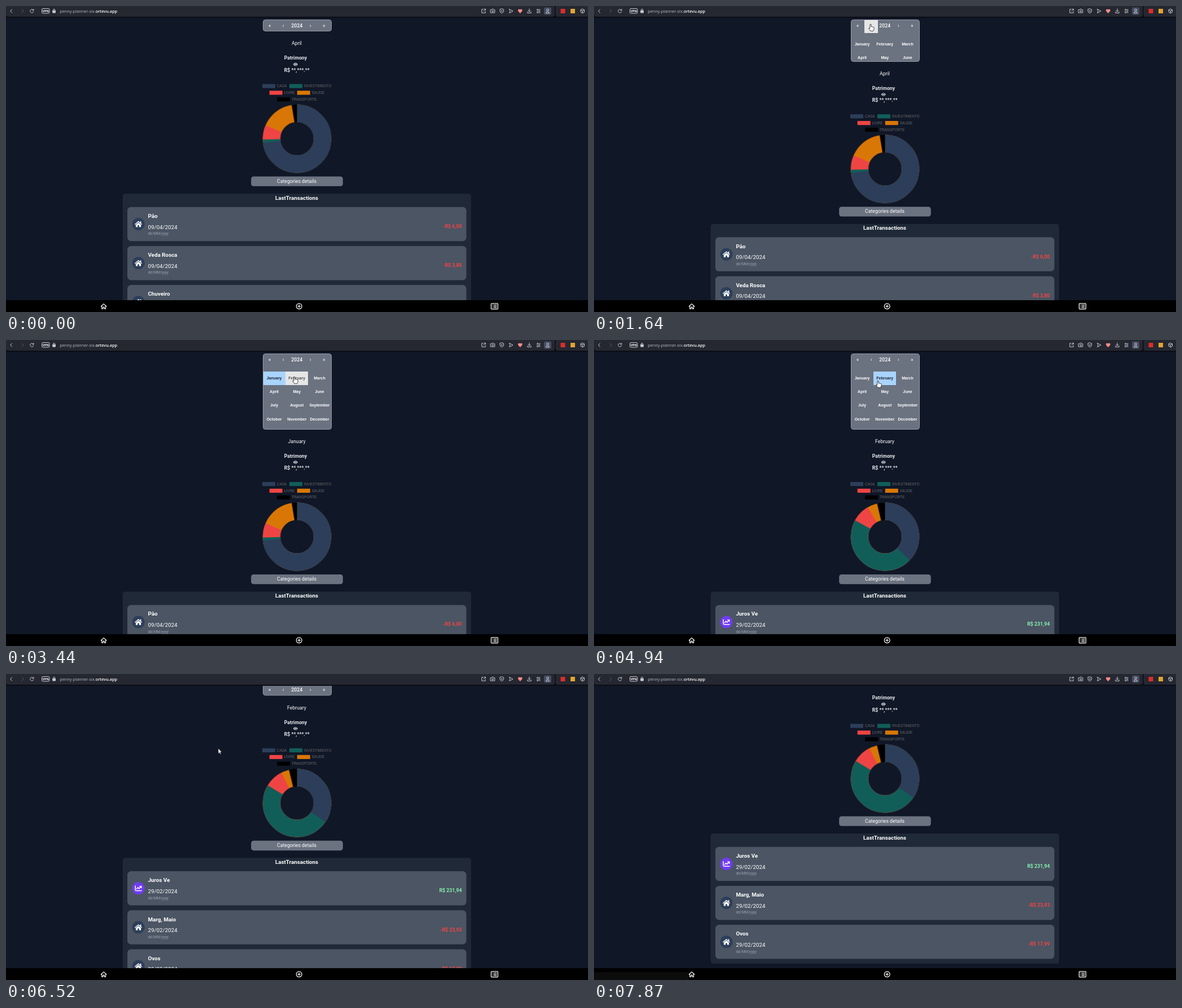
Write an HTML page that moves like this. It is 1031 px wide and 543 px high and loops after 8 s.

```html
<!DOCTYPE html>
<html lang="en">
<head>
<meta charset="utf-8">
<title>Money overview</title>
<style>
html,body{margin:0;width:100%;height:100%;overflow:hidden;background:#101727}
#stage{position:relative;width:1031px;height:543px;overflow:hidden;background:#101727}
#stage svg{position:absolute;left:0;top:0;overflow:visible}
text{font-family:Roboto,sans-serif;font-size:8.72px;fill:#fff}
.mid{text-anchor:middle}
.end{text-anchor:end}
.b{font-weight:700}
.soft{fill:#e5e7eb}
.big{font-size:9.8px}
.hint{font-size:6.54px;fill:#9ca3af}
.legend text{font:6.54px "Liberation Sans",Arial,sans-serif;fill:#666}
.url{font:7.3px "Open Sans",sans-serif;fill:#b9bcc6}
.line{fill:none;stroke:#c6c9d2;stroke-width:1;stroke-linecap:round;stroke-linejoin:round}

#scroll{position:absolute;left:0;top:0;width:1031px;height:543px;animation:scroll 8s infinite}
#below{animation:shift 8s infinite}
#cal{position:absolute;left:455px;top:23.5px;width:121.5px;height:21.5px;box-sizing:border-box;overflow:hidden;
  background:#6b7280;border:1px solid #969ca3;border-radius:4.5px;animation:grow 8s infinite}
#cal div{position:absolute;text-align:center;color:#fff;white-space:nowrap}
.nav{top:-.5px;width:24px;height:24px;font:500 8.72px/23px Roboto,sans-serif}
.month{width:40.2px;height:24.2px;font:700 7px/24px "Liberation Sans",Arial,sans-serif}

.step{animation:8s step-end infinite}
.ring circle{fill:none;stroke-width:30.8;animation:8s infinite}
#cursor{animation:move 8s linear infinite}

@keyframes scroll{0%,80.6%{transform:none;animation-timing-function:ease-in-out}84.2%,to{transform:translateY(-50px)}}
@keyframes shift{
  0%,19.24%{transform:none;animation-timing-function:cubic-bezier(.4,0,.2,1)}
  22.99%{transform:translateY(113.5px)}
  77.2%{transform:translateY(113.5px);animation-timing-function:cubic-bezier(.4,0,.2,1)}
  80.9%,to{transform:none}}
@keyframes grow{
  0%,19.24%{height:21.5px;animation-timing-function:cubic-bezier(.4,0,.2,1)}
  22.99%{height:135px}
  77.2%{height:135px;animation-timing-function:cubic-bezier(.4,0,.2,1)}
  80.9%,to{height:21.5px}}

@keyframes labelA{0%{opacity:1}33.5%,to{opacity:0}}
@keyframes labelB{0%{opacity:0}33.5%{opacity:1}48.75%,to{opacity:0}}
@keyframes labelC{0%{opacity:0}48.75%,to{opacity:1}}
@keyframes dataA{0%{opacity:1}45.6%,to{opacity:0}}
@keyframes dataB{0%{opacity:0}45.6%{opacity:1}55.1%,to{opacity:0}}
@keyframes dataC{0%{opacity:0}55.1%,to{opacity:1}}

@keyframes prev{0%{background:none}19.1%{background:#e6e6e6}24.2%,to{background:none}}
@keyframes jan{0%{background:none;color:#fff}27.2%{background:#e6e6e6;color:#444}
  33.5%{background:#a8d4ff;color:#223}48.75%,to{background:none;color:#fff}}
@keyframes feb{0%{background:none;color:#fff}41.2%{background:#e6e6e6;color:#555}
  48.75%,to{background:#a8d4ff;color:#223}}
@keyframes apr{0%{background:none;color:#fff}75.3%{background:#e6e6e6;color:#444}
  76.7%{background:#30312f;color:#141516}77.9%,to{background:none;color:#fff}}

@keyframes cut0{0%,55.08%{stroke-dasharray:351 360;animation-timing-function:cubic-bezier(.165,.84,.44,1)}67.58%,to{stroke-dasharray:346.2 360}}
@keyframes cut1{0%,55.08%{stroke-dasharray:293.2 360;animation-timing-function:cubic-bezier(.165,.84,.44,1)}67.58%,to{stroke-dasharray:332.4 360}}
@keyframes cut2{0%,55.08%{stroke-dasharray:268.6 360;animation-timing-function:cubic-bezier(.165,.84,.44,1)}67.58%,to{stroke-dasharray:301 360}}
@keyframes cut3{0%,55.08%{stroke-dasharray:262.9 360;animation-timing-function:cubic-bezier(.165,.84,.44,1)}67.58%,to{stroke-dasharray:123.8 360}}

@keyframes move{
  0%,2.4%{transform:translate(979px,545px)}
  11.6%{transform:translate(560px,166px)}
  19.1%{transform:translate(494px,43px)}
  20.4%,23%{transform:translate(490px,32px)}
  29.5%,33.5%{transform:translate(478px,66px)}
  41.2%{transform:translate(496px,66px)}
  43%{transform:translate(511px,65px)}
  49%{transform:translate(508px,68px)}
  61.7%,74.5%{transform:translate(503px,72px)}
  77.1%{transform:translate(448px,100px)}
  81.5%{transform:translate(376px,132px)}
  84.5%{transform:translate(374px,138px)}
  94.1%{transform:translate(562px,526px)}
  96.2%{transform:translate(680px,478px)}
  98.2%,to{transform:translate(776px,546px)}}
@keyframes hand{0%{opacity:0}19.1%{opacity:1}76.7%,to{opacity:0}}
@keyframes arrow{0%{opacity:1}19.1%{opacity:0}76.7%,to{opacity:1}}
@keyframes status{0%{opacity:0}3%{opacity:1}6%{opacity:0}93.8%,to{opacity:1}}
</style>
</head>
<body>
<div id="stage">
  <div id="scroll">
    <div id="cal"></div>
    <svg id="below" width="1031" height="543">
      <text class="mid step" x="515" y="69.3" style="animation-name:labelA">April</text>
      <text class="mid step" x="515" y="69.3" style="animation-name:labelB">January</text>
      <text class="mid step" x="515" y="69.3" style="animation-name:labelC">February</text>
      <text class="b soft" x="492.7" y="95.2">Patrimony</text>
      <path d="M508.7 103.4q4-5.6 8.2 0q-4.2 5.6-8.2 0z" fill="#e5e7eb"/>
      <circle cx="512.8" cy="103.4" r="1.7" fill="#e5e7eb" stroke="#101727" stroke-width=".9"/>
      <text class="b soft" x="492.7" y="116.8">R$ **,***.**</text>
      <g class="legend" id="legend"></g>
      <g class="ring" id="ring" transform="translate(515.5 235.5) rotate(-90)"></g>
      <rect x="434.2" y="302.5" width="162.6" height="17.3" rx="4.4" fill="#6b7280"/>
      <text class="mid" x="515" y="313.8">Categories details</text>
      <rect x="206.7" y="333" width="617.3" height="231" rx="4.4" fill="#1f2937"/>
      <text class="mid big b" x="515" y="343.5">LastTransactions</text>
      <g id="lists"></g>
    </svg>
  </div>

  <svg width="1031" height="543">
    <defs>
      <g id="house" fill="#fff">
        <path d="M-6.6 .2L0-5.4 6.6 .2 5.8 1.2 0-3.6-5.8 1.2z"/>
        <path d="M3.2-5h1.7v3.4H3.2zM-4.6 1.2L0-2.6 4.6 1.2V5.2H1.3V2H-1.3V5.2H-4.6z"/>
      </g>
      <g id="trend" fill="none" stroke="#fff" stroke-width="1.5" stroke-linecap="round" stroke-linejoin="round">
        <path d="M-5.4-4.3V2.6Q-5.4 4.2-3.8 4.2H5.4M-3 .9L-.8-1.5 1.2 .5 4.6-3.2M2.2-3.7H5.2V-.8"/>
      </g>
    </defs>
    <rect width="1031" height="21" fill="#0b0d15"/>
    <path d="M0 0H972V15q0 4-4 4H4q-4 0-4-4z" fill="#252731"/>
    <path d="M973.5 0H1031V19H977.5q-4 0-4-4z" fill="#252731"/>
    <g class="line">
      <path d="M10.5 6L7.8 9 10.5 12"/>
      <path d="M28.2 6L30.9 9 28.2 12" stroke="#5a5d68"/>
      <path d="M48.6 7.4A3.1 3.1 0 1 0 48.9 9.9M49 5.6V7.7H46.9"/>
      <rect x="63.5" y="4.5" width="13.5" height="8.5" rx="2"/>
      <path d="M83.6 8V6.9a1.5 1.5 0 0 1 3 0V8"/>
      <path d="M845.5 5.8H842.8V12.2H849.2V9.5M846 9L849.3 5.6M847.3 5.4H849.4V7.5"/>
      <path d="M858.5 6.6H860.3L861 5.4H863.4L864.1 6.6H865.8V12H858.5z"/><circle cx="862.2" cy="9.2" r="1.4"/>
      <path d="M878.3 5L881.6 6V9Q881.3 11.5 878.3 12.8 875.3 11.5 875 9V6zM877.2 7.8L879.4 10M879.4 7.8L877.2 10"/>
      <path d="M891.7 5.6L898 9 891.7 12.4 892.8 9z"/>
      <path d="M927 5V10M924.9 8L927 10.2 929.1 8M923.8 10.5V12.4H930.2V10.5"/>
      <path d="M940.3 6.3H946.2M940.3 9H946.2M940.3 11.7H946.2M941.6 5.7V6.8M944.8 8.4V9.6M941.6 11.1V12.3"/>
      <rect x="953" y="2.5" width="13" height="13" rx="2.5" fill="#474c62" stroke="none"/>
      <circle cx="959.5" cy="7.2" r="1.9"/><path d="M956.6 12.4Q957 9.8 959.5 9.8T962.4 12.4z"/>
      <path d="M1021.3 5.3L1024.5 7V11L1021.3 12.7 1018.1 11V7zM1018.1 7L1021.3 8.8 1024.5 7M1021.3 8.8V12.7"/>
    </g>
    <text class="mid" x="70.3" y="11.1" style="font:700 5.6px 'Open Sans',sans-serif">VPN</text>
    <rect x="82.2" y="7.8" width="5.8" height="4.6" rx=".8" fill="#c6c9d2"/>
    <text class="url" x="95.3" y="11.6">penny-planner-six.<tspan fill="#fff" font-weight="600">ortevu.app</tspan></text>
    <path d="M910.8 12.9L907.4 9.2Q906.2 7.2 907.6 6T910.8 6.6Q912.6 4.8 914 6T914.2 9.2z" fill="#f38c88"/>
    <rect x="982.5" y="5" width="8" height="8" fill="#d92f2b"/>
    <rect x="1000" y="5" width="8" height="8" fill="#e0a52e"/>

    <rect y="522" width="1031" height="21"/>
    <rect class="step" y="529" width="168" height="14" fill="#0c0c0d" style="animation-name:status"/>
    <g fill="none" stroke="#fff" stroke-width="1.2" stroke-linejoin="round" stroke-linecap="round">
      <path d="M168.4 533L173.1 528.6 177.8 533M169.7 532.2V537.3H171.9V534.3H174.3V537.3H176.5V532.2"/>
      <circle cx="519.2" cy="532.8" r="4.9"/><path d="M516.8 532.8H521.6M519.2 530.4V535.2"/>
      <rect x="859.4" y="527.8" width="12" height="10" rx="1"/>
      <path d="M864 530.5H869M864 532.9H869M864 535.3H869M861.7 530.5V530.5M861.7 532.9V532.9M861.7 535.3V535.3"/>
    </g>

    <g id="cursor">
      <path class="step" d="M0 0V9.2L2.1 7.3 3.5 10.4 5 9.7 3.6 6.7H6.4z" fill="#fff" stroke="#111" stroke-width=".6" style="animation-name:arrow"/>
      <path class="step" d="M-1.1 .9Q0-.8 1.1 .9V4.7Q2.2 3.9 2.9 5 4 4.3 4.6 5.5 6 5 6.1 6.6V8.6Q5.8 10.4 4.7 12.3H-.3Q-1.6 10-3.2 8.1-3.3 6.4-1.1 7.7z"
        fill="#fff" stroke="#111" stroke-width=".8" style="animation-name:hand"/>
    </g>
  </svg>
</div>

<script>
const $ = id => document.getElementById(id);
const colors = ['#2c3e59', '#115e59', '#ef4444', '#d97706', '#000'];

// Calendar: navigation row and month grid
const nav = ['«', '‹', '2024', '›', '»'].map((s, i) =>
  `<div class="nav step" style="left:${i * 24.1 - 1}px;${i == 1 ? 'animation-name:prev' : ''}">${s}</div>`);
const names = 'January February March April May June July August September October November December'.split(' ');
const moves = {January: 'jan', February: 'feb', April: 'apr'};
const months = names.map((m, i) =>
  `<div class="month step" style="left:${i % 3 * 40.2 - 1}px;top:${31.5 + (i / 3 | 0) * 24.2}px;animation-name:${moves[m] || 'none'}">${m}</div>`);
$('cal').innerHTML = nav.concat(months).join('');

// Doughnut: each ring runs from the top to its end angle, the first on top
$('ring').innerHTML = [...colors].reverse().map((c, i) =>
  `<circle r="45.1" pathLength="360" stroke="${c}" style="animation-name:${i ? 'cut' + (i - 1) : 'none'}"/>`).join('');

$('legend').innerHTML = [['CASA', 454, 0], ['INVESTIMENTO', 502, 0], ['LIVRE', 466.7, 1], ['SAUDE', 515.8, 1], ['TRANSPORTE', 480.2, 2]]
  .map(([s, x, row], i) => {
    const y = 138.5 + row * 11.85;
    return `<rect x="${x}" y="${y}" width="23" height="7.2" fill="${colors[i]}"/><text x="${x + 25.7}" y="${y + 5.7}">${s}</text>`;
  }).join('');

// Transaction cards
const card = ([name, date, sum], i) => {
  const gain = sum[0] != '-';
  return `<g transform="translate(215 ${356.7 + i * 69.2})">
    <rect width="600.5" height="60.5" rx="6.5" fill="#4b5563"/>
    <circle cx="19.5" cy="30.3" r="11" fill="${gain ? '#6f3cf0' : colors[0]}"/>
    <use href="#${gain ? 'trend' : 'house'}" x="19.5" y="30.3"/>
    <text class="big b" x="36.4" y="19.3">${name}</text>
    <text class="big" x="36.4" y="38.9">${date}</text>
    <text class="hint" x="36.4" y="49.6">dd/MM/yyyy</text>
    <text class="end b" x="592.4" y="37.3" style="fill:${gain ? '#86efac' : '#ef4444'}">${sum}</text></g>`;
};
const data = {
  A: [['Pão', '09/04/2024', '-R$ 6,00'], ['Veda Rosca', '09/04/2024', '-R$ 3,80'], ['Chuveiro', '09/04/2024', '-R$ 89,90']],
  B: [['Gelo', '31/01/2024', '-R$ 9,00'], ['Feira', '31/01/2024', '-R$ 24,50'], ['Leite', '30/01/2024', '-R$ 11,80']],
  C: [['Juros Ve', '29/02/2024', 'R$ 231,94'], ['Marg, Maio', '29/02/2024', '-R$ 23,93'], ['Ovos', '29/02/2024', '-R$ 17,99']]
};
$('lists').innerHTML = Object.keys(data).map(k =>
  `<g class="step" style="animation-name:data${k}">${data[k].map(card).join('')}</g>`).join('');
</script>
</body>
</html>
```
